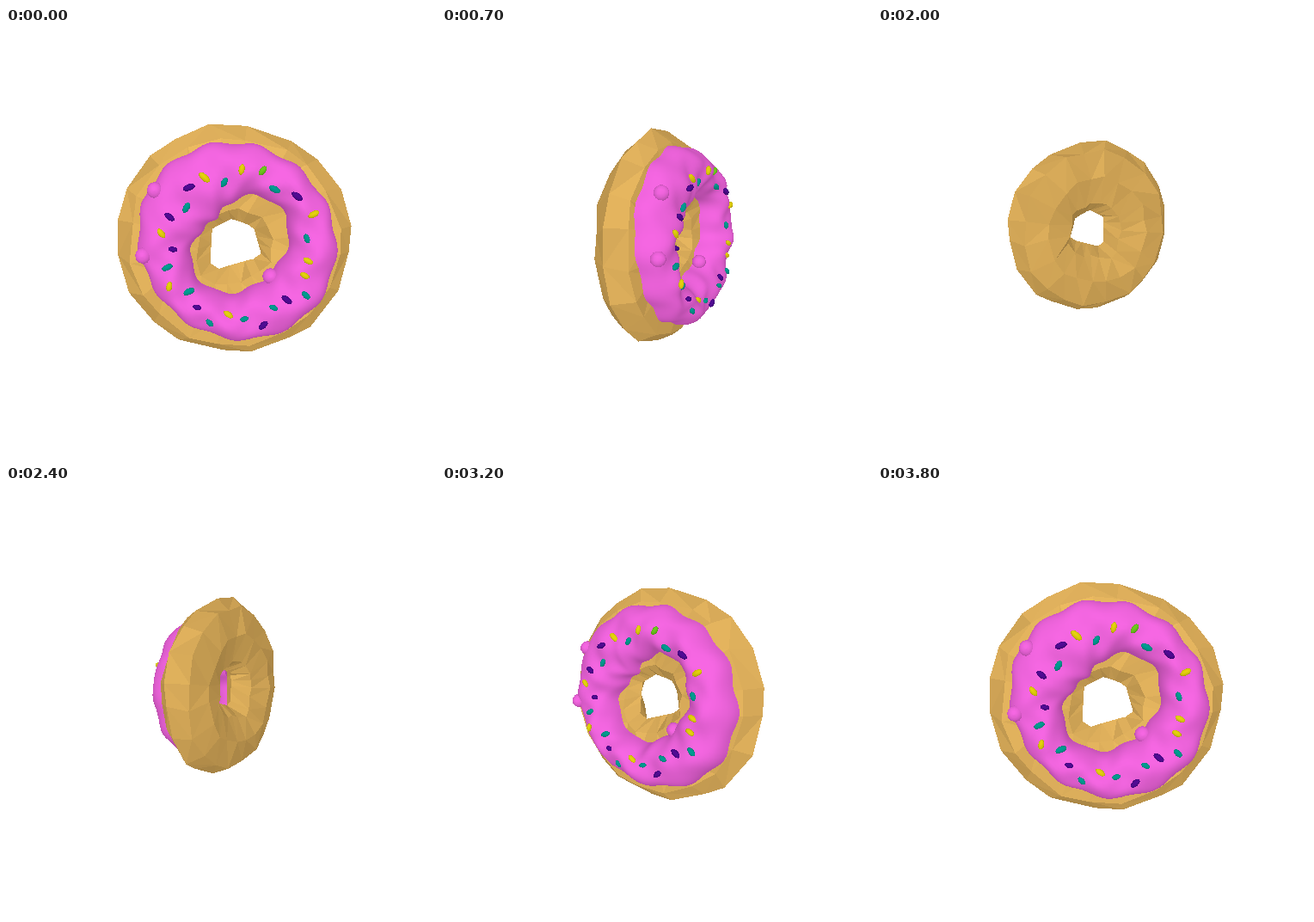
These frames come from a looping animation (500x500 px, 3.9 s). An HTML page with a canvas:

```html
<!DOCTYPE html>
<html lang="en">
<head>
<meta charset="utf-8">
<title>Donut</title>
<style>
html, body { margin: 0; width: 100%; height: 100%; overflow: hidden; background: #fff; }
canvas { display: block; width: 100vw; height: 100vh; }
</style>
</head>
<body>
<canvas id="stage" width="500" height="500"></canvas>
<script>
const SIZE = 500, LOOP = 3900, LAST = 37, FOCAL = 680, PITCH = 0.13;
const TAU = Math.PI * 2, RAD = Math.PI / 180;
const { sin, cos, sqrt, min, max, floor, ceil, hypot, atan2 } = Math;
const SP = sin(PITCH), CP = cos(PITCH);

const ctx = document.getElementById('stage').getContext('2d');
const image = ctx.createImageData(SIZE, SIZE);
const pixels = new Uint32Array(image.data.buffer);
const depth = new Float32Array(SIZE * SIZE);

let seed = 11;
const random = () => (seed = (seed * 16807) % 2147483647) / 2147483647;
const jitter = n => (random() * 2 - 1) * n;

// ---- geometry: x right, y down, z out of the iced side ----
const sub = (a, b) => [a[0] - b[0], a[1] - b[1], a[2] - b[2]];
const cross = (a, b) => [
  a[1] * b[2] - a[2] * b[1], a[2] * b[0] - a[0] * b[2], a[0] * b[1] - a[1] * b[0]
];
const unit = v => { const l = hypot(...v) || 1; return v.map(n => n / l); };

// Grid of nu x nv cells, closed around u and, if wrap is set, around v.
function grid(nu, nv, wrap, color, smooth, at) {
  const verts = [], tris = [], rows = wrap ? nv : nv + 1;
  for (let u = 0; u < nu; u++)
    for (let v = 0; v < rows; v++) verts.push(at(u / nu, v / nv));
  const id = (u, v) => (u % nu) * rows + (wrap ? v % nv : v);
  for (let u = 0; u < nu; u++)
    for (let v = 0; v < nv; v++) {
      const a = id(u, v), b = id(u + 1, v), c = id(u + 1, v + 1), d = id(u, v + 1);
      if (smooth || random() < 0.5) tris.push([a, b, c], [a, c, d]);
      else tris.push([a, b, d], [b, c, d]);
    }
  const faces = tris.map(([a, b, c]) => cross(sub(verts[b], verts[a]), sub(verts[c], verts[a])));
  let normals = faces;
  if (smooth) {
    normals = verts.map(() => [0, 0, 0]);
    tris.forEach((t, i) => t.forEach(v => faces[i].forEach((n, k) => { normals[v][k] += n; })));
  }
  const tint = tris.map(() => smooth ? 1 : 1 + jitter(0.035));
  return { verts, tris, normals: normals.map(unit), color, smooth, tint };
}

// Five sides of the hole: direction in degrees, distance
const HOLE = [[-118, 23], [-69, 22], [-16, 26], [74, 28], [-177, 26]];
const holeRadius = a => min(...HOLE.map(([dir, d]) => d / max(0.25, cos(a - dir * RAD))));

function makeDough() {
  return grid(20, 8, true, [229, 181, 95], false, (u, v) => {
    const loose = v === 0.5 ? 0 : 1;
    const a = u * TAU + 9 * RAD + jitter(0.06) * loose;
    const b = v * TAU, hole = holeRadius(a), rim = 135;
    const r = (rim + hole) / 2 + (rim - hole) / 2 * cos(b) + jitter(3) * loose;
    const z = sin(b) * (sin(b) > 0 ? 26 : 36) + jitter(2.5);
    return [r * cos(a), r * sin(a) + 2 * loose, z];
  });
}

const ICING_Y = -3.5, RIM = 16;

// Cross-section of the icing ring at angle a
function section(a) {
  const t = a - 45 * RAD;
  const outer = 111 + 5 * cos(t) + 4 * cos(2 * t) + 2 * sin(13 * a);
  const inner = 52 + 13 * cos(t) - 8 * cos(2 * t) + 2 * sin(9 * a);
  return { mid: (outer + inner) / 2, half: (outer - inner) / 2 };
}
// Height of the icing at angle a; k runs from -1 inside to 1 outside
function height(a, k) {
  const arch = max(0, 1 - k * k) ** 0.4;
  const lumps = 2.5 * sin(8 * a + 3 * k) + 1.5 * sin(13 * a - 4 * k);
  return RIM + arch * (38 + lumps);
}

function makeIcing() {
  return grid(120, 20, false, [247, 104, 228], true, (u, v) => {
    const a = u * TAU, k = cos(v * Math.PI), s = section(a), r = s.mid + s.half * k;
    return [r * cos(a), r * sin(a) + ICING_Y, height(a, k)];
  });
}
function surface(x, y) {
  y -= ICING_Y;
  const a = atan2(y, x), s = section(a);
  return height(a, max(-0.96, min(0.96, (hypot(x, y) - s.mid) / s.half)));
}

// Point of the icing seen at an offset from the centre of the front view
function place(r, a) {
  let x = 0, y = 0, z = 50;
  for (let i = 0; i < 4; i++) {
    const q = FOCAL / (FOCAL - (z * CP - y * SP));
    x = r * cos(a) / q;
    y = (r * sin(a) / q - z * SP) / CP;
    z = surface(x, y);
  }
  return [x, y, z];
}
function blob([x, y, z], len, wide, tilt, color) {
  const c = cos(tilt), s = sin(tilt);
  return grid(12, 8, false, color, true, (u, v) => {
    const lat = (v - 0.5) * Math.PI;
    const p = len * cos(u * TAU) * cos(lat), q = wide * sin(u * TAU) * cos(lat);
    return [x + p * c - q * s, y + p * s + q * c, z + wide * sin(lat)];
  });
}

const COLORS = { t: [0, 158, 148], p: [82, 12, 150], y: [232, 212, 12], g: [112, 204, 30] };
const ORDER = 'yytptptytptytpyptpytygtpyt';

// Sprinkles go once around the ring and weave in and out
function makeSprinkle(key, i) {
  const turn = i / ORDER.length;
  const a = (16 + 360 * turn - 25 * sin(Math.PI * turn)) * RAD;
  const r = 86 + 11 * cos(a - 50 * RAD) + 9 * cos((i - 2) * 2.03);
  const [x, y, z] = place(r, a), size = random();
  return blob([x, y, z + 1], 4.8 + 2.6 * size, 3 + 0.7 * size, random() * Math.PI, COLORS[key]);
}

const icing = makeIcing();
const drops = [[107, 170], [108, 212], [60, 45]]
  .map(([r, deg]) => blob(place(r, deg * RAD), 9, 9, 0, icing.color));
const meshes = [makeDough(), icing, ...drops, ...[...ORDER].map(makeSprinkle)];

// ---- motion ----
// Key poses: step, yaw in degrees, centre x
const POSES = [[0, 0, 265], [3, 30, 259], [6, 62, 258], [11, 138, 258],
  [19, 205, 245], [27, 270, 258], [31, 327, 252], [LAST, 360, 265]];

// Smooth curve through one column of the poses
function track(col, s) {
  const n = POSES.length;
  let i = 0;
  while (i < n - 2 && s >= POSES[i + 1][0]) i++;
  const slope = j => {
    const a = POSES[max(0, j - 1)], b = POSES[min(n - 1, j + 1)];
    return (b[col] - a[col]) / (b[0] - a[0]);
  };
  const from = POSES[i], to = POSES[i + 1], w = to[0] - from[0];
  const k = (s - from[0]) / w, k2 = k * k, k3 = k2 * k;
  return from[col] * (2 * k3 - 3 * k2 + 1) + to[col] * (3 * k2 - 2 * k3) +
    w * (slope(i) * (k3 - 2 * k2 + k) + slope(i + 1) * (k3 - k2));
}

// ---- drawing ----
function fill(a, b, c, sa, sb, sc, color) {
  const area = (b[0] - a[0]) * (c[1] - a[1]) - (b[1] - a[1]) * (c[0] - a[0]);
  if (!area) return;
  const x0 = max(0, floor(min(a[0], b[0], c[0]))), x1 = min(SIZE - 1, ceil(max(a[0], b[0], c[0])));
  const y0 = max(0, floor(min(a[1], b[1], c[1]))), y1 = min(SIZE - 1, ceil(max(a[1], b[1], c[1])));
  for (let y = y0; y <= y1; y++)
    for (let x = x0; x <= x1; x++) {
      const px = x + 0.5, py = y + 0.5;
      const v = ((px - a[0]) * (c[1] - a[1]) - (py - a[1]) * (c[0] - a[0])) / area;
      const w = ((b[0] - a[0]) * (py - a[1]) - (b[1] - a[1]) * (px - a[0])) / area;
      const u = 1 - v - w;
      if (u < 0 || v < 0 || w < 0) continue;
      const z = u * a[2] + v * b[2] + w * c[2], at = y * SIZE + x;
      if (z <= depth[at]) continue;
      depth[at] = z;
      const s = u * sa + v * sb + w * sc;
      const [r, g, bl] = color.map(n => min(255, n * s));
      pixels[at] = (255 << 24 | bl << 16 | g << 8 | r) >>> 0;
    }
}

function render(step) {
  const orbit = step / LAST * 360, deg = track(1, step);
  const cy = cos(deg * RAD), sy = sin(deg * RAD);
  const zoom = 1 / (1.178 - 0.178 * cos(orbit * RAD));
  const ox = track(2, step), oy = 184 + 62 * zoom;
  const skew = 0.0115 * (deg - orbit);
  const turn = ([x, y, z]) => {
    const d = z * cy - x * sy;
    return [x * cy + z * sy, y * CP + d * SP, d * CP - y * SP];
  };
  const project = p => {
    const [x, y, z] = turn(p), q = FOCAL / (FOCAL / zoom - z - skew * x);
    return [ox + x * q, oy + y * q, q];
  };
  const light = n => {
    const [x, y, z] = turn(n);
    const dim = n[2] < 0 ? 1 + 0.05 * n[2] : 1;
    return (0.71 + 0.29 * max(0, -0.06 * x - 0.22 * y + 0.97 * z)) * dim;
  };
  pixels.fill(0xffffffff);
  depth.fill(0);
  for (const m of meshes) {
    const pts = m.verts.map(project), lit = m.normals.map(light);
    m.tris.forEach(([a, b, c], i) => {
      const flat = lit[i] * m.tint[i];
      if (m.smooth) fill(pts[a], pts[b], pts[c], lit[a], lit[b], lit[c], m.color);
      else fill(pts[a], pts[b], pts[c], flat, flat, flat, m.color);
    });
  }
  ctx.putImageData(image, 0, 0);
}

let shown = -1;
const start = performance.now();
function tick() {
  const t = (performance.now() - start) % LOOP;
  const step = max(0, floor(t / 100) - 1);
  if (step !== shown) render(shown = step);
  requestAnimationFrame(tick);
}
tick();
</script>
</body>
</html>
```
